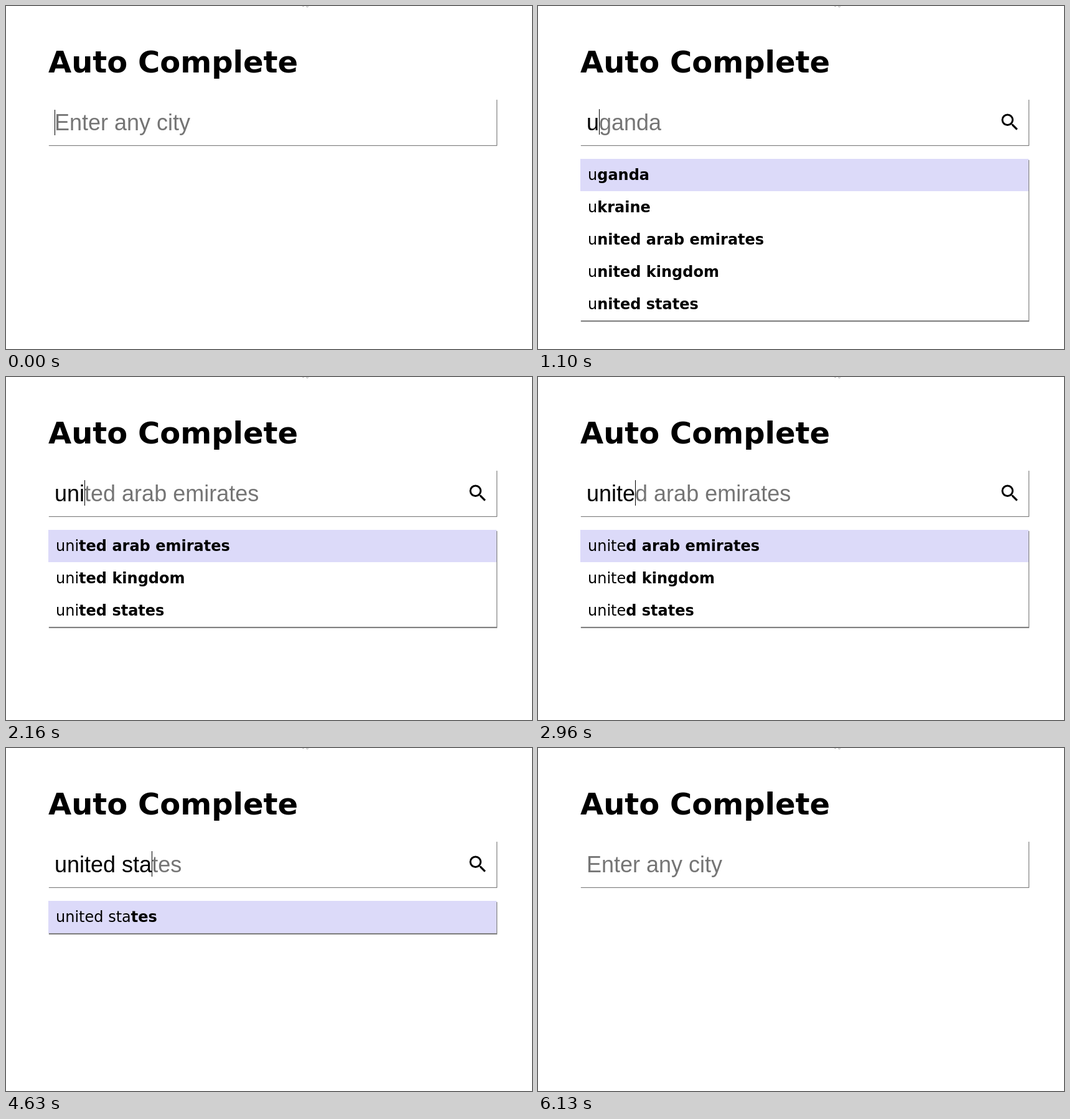
An HTML page for the animation above (6.16 s loop, 845 by 552 pixels).

```html
<!DOCTYPE html>
<html lang="en">
<head>
<meta charset="utf-8">
<title>Auto Complete</title>
<style>
  html, body { margin: 0; width: 100%; height: 100%; overflow: hidden; background: #fff; }
  #stage { position: relative; width: 845px; height: 552px; overflow: hidden;
    color: #000; font-family: "DejaVu Sans", sans-serif; white-space: pre; }
  #stage > * { position: absolute; }
  h1 { margin: 0; left: 68px; top: 62px; font: bold 48px/56px "DejaVu Sans", sans-serif; }
  #field { left: 68px; top: 150px; width: 720px; height: 74px;
    background: #fff; box-shadow: 1px 1px 1px gray; }
  #entry { left: 78px; top: 167px; font: 36px/41px "Liberation Sans", Arial, sans-serif; }
  #ghost { color: #757575; }
  #caret { position: absolute; width: 1px; height: 41px; background: #000; }
  #icon { left: 740px; top: 169px; }
  #list { left: 68px; top: 246px; width: 720px; background: #fff;
    box-shadow: 1px 2px 1px gray; }
  .row { height: 52px; padding-left: 12px; font-size: 24px; line-height: 52px; }
  .row:first-child { background: #dcdaf9; }
  #tip { left: 475px; top: 0; }
</style>
</head>
<body>
<div id="stage">
  <svg id="tip" width="12" height="3" fill="none" stroke="#aaa">
    <path d="M1 .3h3M7 .5l2 1.3 2-1.3"/>
  </svg>
  <h1>Auto Complete</h1>
  <div id="field"></div>
  <div id="entry"><span id="typed"></span><span id="caret"></span><span id="ghost"></span></div>
  <svg id="icon" width="36" height="36" viewBox="0 0 24 24">
    <circle cx="9.5" cy="9.5" r="5.5" fill="none" stroke="#000" stroke-width="2"/>
    <path d="M15.5 14h-.79l-1-1-.71.71 1 1v.79l5 4.99L20.49 19z"/>
  </svg>
  <div id="list"></div>
</div>
<script>
const LOOP = 6160, BLINK = 500, CLEAR_AT = 5600;
const QUERY = "united states";
const COUNTRIES = ["uganda", "ukraine", "united arab emirates", "united kingdom", "united states"];
const $ = id => document.getElementById(id);

// The first word is typed slowly, the second one faster.
const keyTime = i => i < 7 ? 1000 + 440 * i : 4080 + 210 * (i - 7);

function stateAt(time) {
  if (time >= CLEAR_AT) return { count: 0, since: CLEAR_AT };
  let count = 0;
  while (count < QUERY.length && keyTime(count) <= time) count++;
  return { count, since: count ? keyTime(count - 1) : 0 };
}

function makeRow(name, count) {
  const row = document.createElement("div");
  const rest = document.createElement("b");
  row.className = "row";
  rest.textContent = name.slice(count);
  row.append(name.slice(0, count), rest);
  return row;
}

function showText(count) {
  const typed = QUERY.slice(0, count);
  const matches = count ? COUNTRIES.filter(name => name.startsWith(typed)) : [];
  $("typed").textContent = typed;
  $("ghost").textContent = count ? matches[0].slice(count) : "Enter any city";
  $("caret").style.top = count ? "-1px" : "0";
  $("icon").style.display = count ? "block" : "none";
  $("list").style.display = count ? "block" : "none";
  $("list").replaceChildren(...matches.map(name => makeRow(name, count)));
}

let shown = -1;
function render(time) {
  const { count, since } = stateAt(time);
  if (count !== shown) showText(shown = count);
  const on = Math.floor((time - since) / BLINK) % 2 === 0;
  $("caret").style.visibility = on ? "visible" : "hidden";
}

const start = performance.now();
function tick() {
  render((performance.now() - start) % LOOP);
  requestAnimationFrame(tick);
}
tick();
</script>
</body>
</html>
```
